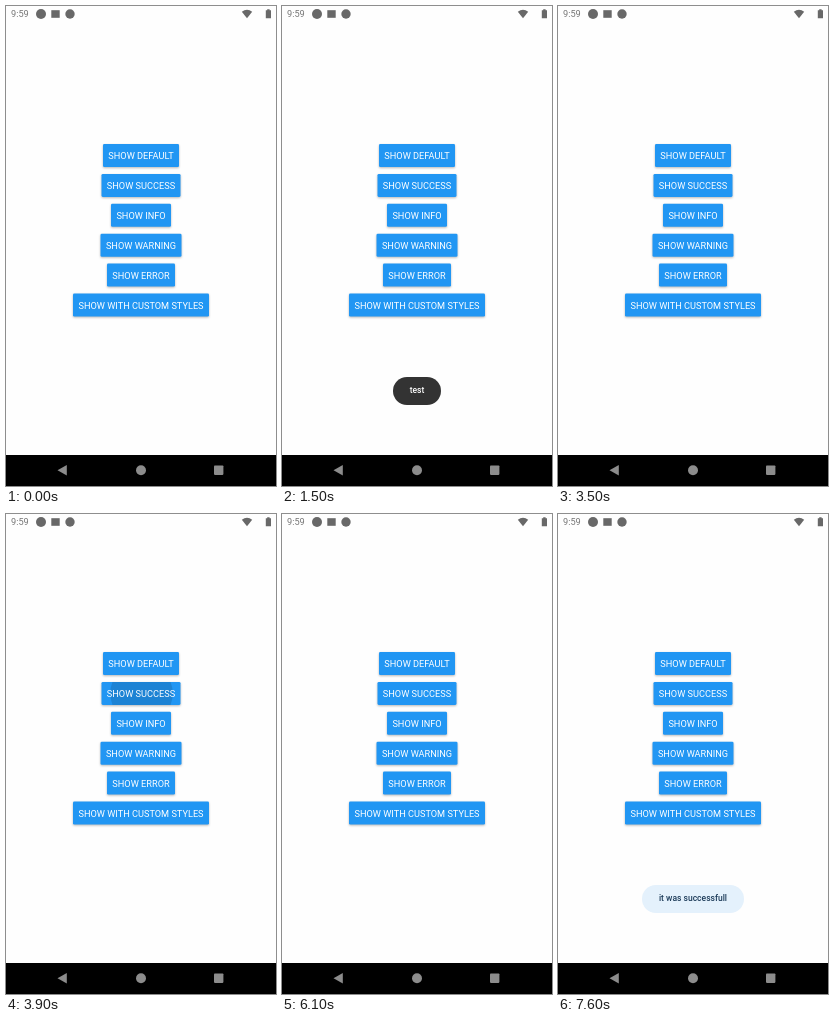
An HTML page for the animation above (8000 ms loop, 270 by 480 pixels).

```html
<!DOCTYPE html>
<html lang="en">
<head>
<meta charset="utf-8">
<title>Toast demo</title>
<style>
html, body { margin: 0; width: 100%; height: 100%; overflow: hidden; background: #fefefe; }
svg { display: block; width: 270px; height: 480px; font: 9.2px Roboto, sans-serif; }
.label { fill: #fff; text-anchor: middle; }
.button { fill: #2196f3; filter: drop-shadow(0 1px 1px rgba(0, 0, 0, .28)); }
.toast { font-size: 8.53px; font-weight: 500; text-anchor: middle; }
</style>
</head>
<body>
<svg viewBox="0 0 270 480">
  <rect width="270" height="480" fill="#fefefe"/>
  <g fill="#686868">
    <text x="5" y="11.4" fill="#757575">9:59</text>
    <circle cx="35" cy="8" r="5"/>
    <rect x="45.3" y="4.2" width="8.4" height="7.6"/>
    <circle cx="64" cy="8" r="4.7"/>
    <path d="M235.8 5.7Q241 1.6 246.2 5.7L241 12.2Z"/>
    <path d="M259.8 4.2h1.4v-1h2.4v1h1.4v8h-5.2z"/>
  </g>
  <g id="buttons"></g>
  <g id="toasts"></g>
  <rect y="449" width="270" height="31"/>
  <g fill="#8c8c8c">
    <path d="M51.5 464.2L60.8 459v10.4z"/>
    <circle cx="135" cy="464.2" r="5"/>
    <rect x="208" y="459.5" width="9.4" height="9.4" rx=".8"/>
  </g>
</svg>
<script>
const LOOP = 8000;
const buttons = [
  ['DEFAULT', 76], ['SUCCESS', 79], ['INFO', 60],
  ['WARNING', 81], ['ERROR', 68], ['WITH CUSTOM STYLES', 136]
];
// Each press starts a ripple on its button and brings up a toast.
const presses = [
  { at: 1050, out: 3270, fade: 230, text: 'test', width: 48, fill: '#333', ink: '#fff' },
  { at: 3830, out: 6050, fade: 1, text: 'it was successfull', width: 102, fill: '#e8f5e9', ink: '#29472b' },
  { at: 6350, out: 8570, fade: 230, text: 'it was successfull', width: 102, fill: '#e4f1fc', ink: '#1d3c5a' }
];
const byId = id => document.getElementById(id);
const clamp = v => Math.min(1, Math.max(0, v));

byId('buttons').innerHTML = buttons.map(([name, w], i) => {
  const y = 138 + i * 29.9;
  const box = `x="${135 - w / 2}" y="${y}" width="${w}" height="23" rx="1.3"`;
  return `<rect class="button" ${box}/>
    <clipPath id="clip${i}"><rect ${box}/></clipPath>
    <g clip-path="url(#clip${i})"><circle class="ripple" cx="135.5" cy="${y + 11.5}" r="0" opacity="0"/></g>
    <text class="label" x="135" y="${y + 15}">SHOW ${name}</text>`;
}).join('');

byId('toasts').innerHTML = presses.map(p =>
  `<g class="toast" opacity="0">
    <rect x="${135 - p.width / 2}" y="371" width="${p.width}" height="28" rx="14" fill="${p.fill}"/>
    <text x="135" y="387.2" fill="${p.ink}">${p.text}</text>
  </g>`).join('');

const ripples = document.querySelectorAll('.ripple');
const toasts = document.querySelectorAll('.toast');

function draw(now) {
  const t = now % LOOP;
  presses.forEach((p, i) => {
    const age = t - p.at;
    ripples[i].setAttribute('r', 44 * clamp(age / 100));
    ripples[i].setAttribute('opacity', 0.13 * clamp(age / 50) * clamp((350 - age) / 150));
    const shown = clamp((age - 180) / 250) * clamp(1 - (t - p.out) / p.fade);
    toasts[i].setAttribute('opacity', shown);
  });
}

const start = performance.now();
function tick() {
  draw(performance.now() - start);
  requestAnimationFrame(tick);
}
tick();
</script>
</body>
</html>
```
